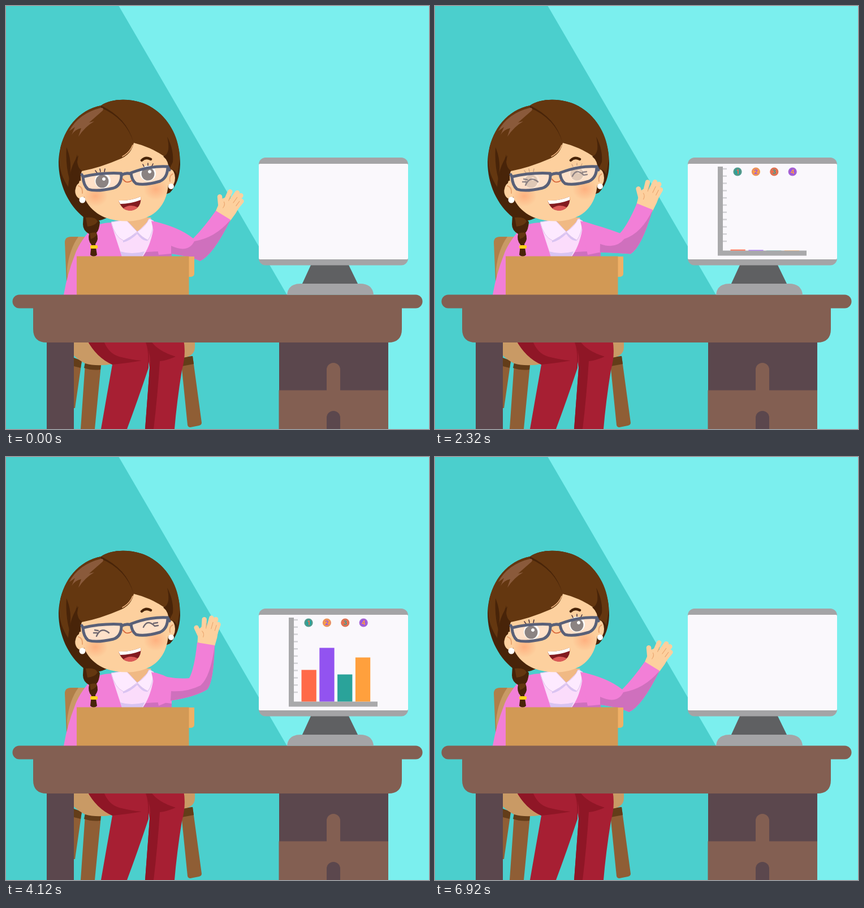
An HTML page that plays this animation: 748 by 748 pixels, repeating every 7000 ms.

```html
<!DOCTYPE html>
<html lang="en">
<head>
<meta charset="utf-8">
<title>Teacher at a desk</title>
<style>
html, body { margin: 0; width: 100%; height: 100%; overflow: hidden; background: #4bcfcd; }
svg { display: block; width: 100vw; height: 100vh; }
text { font: 700 11px Inter, Arial, sans-serif; text-anchor: middle; }
.line { fill: none; stroke-linecap: round; stroke-linejoin: round; }
</style>
</head>
<body>
<svg viewBox="0 0 748 748">
<defs>
  <radialGradient id="blush">
    <stop offset="0" stop-color="#ff9c6c" stop-opacity=".6"/>
    <stop offset="1" stop-color="#ff9c6c" stop-opacity="0"/>
  </radialGradient>
</defs>
<path fill="#4bcfcd" d="M0 0H748V748H0Z"/>
<path fill="#7befee" d="M199.500 0H748V748H635Z"/>

<!-- chair -->
<path fill="#b07f49" d="M104 418Q104 408 115 408H150V511H108Z"/>
<path fill="#c99a65" d="M128 408H150V511H110L108 465Q112 430 128 408Z"/>
<path fill="#8f5e35" d="M119 622L134 628 122 711H119ZM140 632L168 635 157 748H132ZM309 622L330 619 346 737Q346 741 341 742L326 745Q322 745 321 741Z"/>
<path fill="#633d19" d="M120 622L134 627 132 640 120 637ZM140 630L168 633 167 643Q152 645 138 640ZM309 622L330 619 332 633 311 637Z"/>
<path fill="#c99a65" d="M120 590H334V604Q333 620 312 622L190 633Q160 638 140 632Q128 626 120 618Z"/>

<!-- legs -->
<path fill="#a71f33" d="M143 590H252L252 640Q232 700 214 748H168Q178 690 188 634Q161 622 143 590Z"/>
<path fill="#a71f33" d="M245 590H314Q319 616 311 644Q302 700 298 748H246L254 640Z"/>
<path fill="#8f1626" d="M143 590H172Q180 614 200 620Q224 626 240 627Q212 632 188 634Q160 622 143 590ZM247 595Q257 610 250 645Q254 612 247 595Z"/>
<path fill="#8f1626" d="M246 592H256Q268 610 300 620Q284 627 272 628Q268 690 261 748H246L254 640Q258 618 246 592Z"/>

<!-- torso -->
<path fill="#f27fd7" d="M187 383Q163 383 150 395Q128 420 121 442Q108 475 102 511H140L150 445H293V395Q280 384 258 380Z"/>
<path fill="#cf70bd" d="M243 436Q270 432 293 436V444H240Z"/>
<path fill="#fbdcfb" d="M186 384L210 376H256L262 384Q258 420 242 443H205Q194 410 186 384Z"/>
<path fill="#d9c4f2" d="M207 415L233 400 251 415Q242 417 232 403Q220 415 207 418ZM202 434Q222 440 245 434L241 443H205Z"/>
<path fill="#f0b984" d="M207 374H257L250 382 232 400Q215 388 207 374Z"/>
<path fill="#fdeaff" stroke="#dcc0ec" d="M212 378L186 382Q192 408 208 415Q222 408 232 399ZM253 376L261 380Q260 402 251 414Q240 409 232 399Q247 390 253 376Z"/>

<!-- waving arm -->
<g id="hand">
  <path fill="#fdd09e" d="M-15 1Q-17 -14 -18 -22L-12 -30 17 -28Q18 -14 16 1Q16 11 0 11Q-14 11 -15 1Z"/>
  <path class="line" stroke="#fdd09e" stroke-width="8.5" d="M-11 -10Q-17 -18 -22 -25M-8 -20L-11 -42M-1 -22L1 -47M6 -20L9 -46M12 -18L15 -38"/>
  <path class="line" stroke="#e9a26b" stroke-width="1" d="M-5 -27L-6 -36M4 -28L5 -40M11 -26L12 -36M-11 -21Q-6 -18 -7 -11"/>
  <path class="line" stroke="#e9a26b" stroke-width="2" d="M-14 1Q0 8 15 2"/>
</g>
<path id="sleeve" fill="#f27fd7"/>
<path id="shade" fill="#cf70bd"/>

<!-- head -->
<path fill="#482409" d="M168 176C185 164 215 163 240 171C283 186 308 230 308 280Q307 312 290 330L170 378Q150 384 138 374C110 352 93 315 93 276C94 230 122 185 168 176Z"/>
<g fill="#fdd09e">
  <ellipse cx="132" cy="325" rx="10" ry="16"/>
  <ellipse cx="291" cy="304" rx="8" ry="15"/>
  <path d="M133 285C128 335 145 361 175 374C210 386 245 381 265 364C286 345 290 320 287 272L262 240H210Z"/>
</g>
<path class="line" stroke="#eaa671" stroke-width="2" d="M128 318Q136 320 135 331M295 297Q288 300 290 310"/>
<ellipse cx="158" cy="336" rx="22" ry="19" fill="url(#blush)"/>
<ellipse cx="265" cy="324" rx="22" ry="19" fill="url(#blush)"/>
<circle cx="135" cy="343" r="5.5" fill="#fff"/>
<circle cx="292" cy="319" r="5" fill="#fff"/>
<path fill="#643710" d="M168 176C185 164 215 163 240 171C283 186 308 230 307 272L303 298Q297 286 288 290Q288 276 283 268Q256 249 226 242Q222 262 203 270Q166 286 134 292L126 306Q123 285 128 264Q112 285 110 320Q95 298 94 272C95 228 122 185 168 176Z"/>
<path fill="#482409" d="M168 176Q214 198 225 240Q212 199 168 180ZM107 250Q118 275 112 306Q105 280 107 250ZM126 262Q124 285 134 291L129 313Q121 318 122 337Q108 315 126 262ZM285 231Q297 254 295 276L288 290Q288 274 278 266Q292 262 285 231Z"/>
<path fill="#8a5a3b" d="M112 221Q128 190 168 180Q174 180 171 185L147 206 156 204Q140 213 128 231L133 216Q122 218 116 228L122 214Z"/>
<path class="line" stroke="#f3b984" stroke-width="1.5" d="M224 246Q219 259 206 266"/>
<path class="line" stroke="#482409" stroke-width="4.5" d="M240 273Q247 266 256 271"/>

<g fill="#ffeee8" fill-opacity=".58">
  <path id="lensL" d="M136 302Q170 294 204 296Q205 317 190 322Q160 329 145 324Q137 317 136 302Z"/>
  <path id="lensR" d="M221 295Q255 282 286 284Q286 304 272 310Q245 318 230 314Q222 308 221 295Z"/>
</g>
<g id="open">
  <ellipse cx="171" cy="309" rx="14" ry="13.500" fill="#fff"/>
  <ellipse cx="251" cy="296" rx="14" ry="13.500" fill="#fff"/>
  <circle cx="170" cy="310" r="11.5" fill="#8b8382"/>
  <circle cx="251" cy="297" r="11.5" fill="#8b8382"/>
  <path fill="#fff" d="M173 303a3 3 0 1 0 .1 0ZM254 290a3 3 0 1 0 .1 0Z"/>
  <path class="line" stroke="#4d3740" stroke-width="1.6" d="M161 295L158 291M167 293L166 288M174 293L175 288M244 284L242 280M251 282L251 278M258 283L260 279"/>
</g>
<g id="shut">
  <path class="line" stroke="#706870" stroke-width="2.4" d="M160 317Q168 299 182 311M155 311L161 311M157 306L163 307M243 301Q250 286 263 299M261 294L268 293M263 299L269 298"/>
</g>
<g class="line" stroke="#596078" stroke-width="5">
  <use href="#lensL" fill="none"/><use href="#lensR" fill="none"/>
  <path d="M204 299Q212 294 221 297M286 284L289 290M136 302L134 298"/>
</g>
<path class="line" stroke="#d76539" stroke-width="1.7" d="M207 306Q212 315 222 309"/>
<path fill="#821b20" d="M199 344Q220 345 238 337Q240 351 231 358Q222 364 211 360Q203 356 199 344Z"/>
<path fill="#fff" d="M199 344Q220 345 238 337L238 343Q220 350 202 350Z"/>
<path fill="#dc5a57" d="M207 358Q219 349 233 356Q227 362 219 362Q212 361 207 358Z"/>

<!-- braid -->
<path fill="#482409" d="M137 368Q158 369 166 382Q165 396 160 401Q165 412 158 421L161 440Q155 446 149 440L151 422Q144 414 147 403Q136 397 136 386Z"/>
<path fill="#643710" d="M141 374Q159 372 162 381Q157 389 144 390ZM148 402Q163 398 160 405Q157 410 150 412Z"/>
<rect x="149" y="423" width="13" height="6" rx="2" fill="#ffd21c"/>

<!-- laptop and desk -->
<path fill="#efb066" d="M320 443H333V473Q333 479 325 479H320Z"/>
<path fill="#d29955" d="M125 442.500H323.500V511H125Z"/>
<path fill="#5b474d" d="M72 590H120V748H72ZM483 590H676V680H483Z"/>
<path fill="#835f52" d="M482.500 679.500H676V748H482.500ZM567 680V643a12 12 0 0 1 24 0V680Z"/>
<path fill="#5b474d" d="M567 748V728a12 12 0 0 1 24 0V748Z"/>
<rect x="11.500" y="510.500" width="725" height="24" rx="12" fill="#835f52"/>
<path fill="#835f52" d="M48 530H700V571Q700 595 676 595H72Q48 595 48 571Z"/>

<!-- monitor -->
<path fill="#5f6062" d="M540 456H605L623 493H523Z"/>
<path fill="#a4a4a6" d="M497 510.500Q499 491 521 491H626Q648 491 650 510.500Z"/>
<rect x="447" y="268" width="264" height="190.500" rx="12" fill="#a4a4a6"/>
<rect x="447" y="279" width="264" height="169" rx="2" fill="#faf8fc"/>
<g id="chart">
  <path id="ticks" stroke="#d2d2d6" stroke-width="2.500"/>
  <path fill="#a9a9ab" d="M500 284H509V432.500H657V441.500H500Z"/>
  <g id="badges"></g>
</g>
<g id="bars"></g>
</svg>
<script>
const LOOP = 7000, STEP = 40, BASE = 432.5;
const get = id => document.getElementById(id);
const clamp = v => Math.max(0, Math.min(1, v));
const ease = v => v * v * (3 - 2 * v);
const ramp = (t, from, to) => ease(clamp((t - from) / (to - from)));

function add(parent, tag, attrs, label = "") {
  const el = document.createElementNS("http://www.w3.org/2000/svg", tag);
  for (const key in attrs) el.setAttribute(key, attrs[key]);
  el.textContent = label;
  parent.append(el);
  return el;
}

// Interpolates rows of [time, values].
function sample(rows, t) {
  let i = 0;
  while (i < rows.length - 2 && t >= rows[i + 1][0]) i++;
  const [t0, a] = rows[i], [t1, b] = rows[i + 1];
  const k = ramp(t, t0, t1);
  return a.map((v, n) => v + (b[n] - v) * k);
}

// Top bend, inner elbow, inner bend, wrist pair, outer bend, outer elbow,
// lower bend, armpit, three shade points, shade end, hand angle.
const OUT = [305,390, 331,411, 350,392, 371,362, 397,378, 366,441, 343,451,
  327,443, 292,438, 370,410, 333,416, 322,438, 292,424, 31];
const UP = [285,393, 318,381, 322,372, 325,319, 357,320, 364,395, 352,410,
  335,424, 291,430, 356,383, 338,403, 315,414, 292,413, 0];
const MID = [290,394, 324,391, 333,375, 338,328, 369,333, 367,398, 356,411,
  335,424, 291,431, 362,388, 344,404, 320,416, 292,414, 11];
const ARM = [[0, OUT], [2100, OUT], [2700, UP], [3200, UP], [4120, MID], [4800, OUT], [LOOP, OUT]];

const HEIGHTS = [[0, [0,0,0,0]], [2240, [0,0,0,0]], [3000, [58,33,9,15]],
  [4120, [56,95,48,78]], [5000, [126,81,85,54]], [5440, [64,120,113,86]], [LOOP, [64,120,113,86]]];

const TEAL = "#2aa39a", ORANGE = "#ffa03d", RED = "#ff6a48", PURPLE = "#9253f0";
const bars = [RED, PURPLE, TEAL, ORANGE].map((fill, i) =>
  add(get("bars"), "rect", { x: 522.5 + i * 31.8, width: 26.3, fill }));

const badges = [[TEAL, RED], [ORANGE, PURPLE], [RED, TEAL], [PURPLE, ORANGE]].map(([back, ink], i) => {
  const g = add(get("badges"), "g", {});
  const x = 535 + i * 32.4;
  add(g, "circle", { cx: x, cy: 293, r: 7.6, fill: back });
  add(g, "circle", { cx: x, cy: 293, r: 6.2, fill: "none", stroke: ink, "stroke-width": 0.8, opacity: 0.6 });
  add(g, "text", { x, y: 297, fill: ink }, i + 1);
  return g;
});

get("ticks").setAttribute("d",
  Array.from({ length: 11 }, (_, i) => `M509 ${288 + i * 12.8}h7`).join(""));

function drawArm(t) {
  const p = sample(ARM, t);
  const at = n => p[2 * n].toFixed(2) + " " + p[2 * n + 1].toFixed(2);
  get("sleeve").setAttribute("d", `M257 380Q${at(0)} ${at(1)}Q${at(2)} ${at(3)}L${at(4)}` +
    `Q${at(5)} ${at(6)}Q${at(7)} ${at(8)}L270 440Z`);
  get("shade").setAttribute("d", `M${at(4)}Q${at(5)} ${at(6)}Q${at(7)} ${at(8)}` +
    `L${at(12)}Q${at(11)} ${at(10)}Q${at(9)} ${at(4)}Z`);
  const x = (p[6] + p[8]) / 2, y = (p[7] + p[9]) / 2;
  get("hand").setAttribute("transform", `translate(${x} ${y}) rotate(${p[26]})`);
}

function draw(t) {
  drawArm(t);
  const smile = ramp(t, 2160, 2400) * (1 - ramp(t, 5120, 5500));
  get("shut").setAttribute("opacity", smile);
  get("open").setAttribute("opacity", 1 - smile);

  get("chart").setAttribute("opacity", ramp(t, 400, 900) * (1 - ramp(t, 6560, 6880)));
  badges.forEach((g, i) => g.setAttribute("opacity", ramp(t, 800 + i * 120, 1120 + i * 120)));

  get("bars").setAttribute("opacity", 1 - ramp(t, 5120, 5500));
  sample(HEIGHTS, t).forEach((h, i) => {
    bars[i].setAttribute("y", BASE - h);
    bars[i].setAttribute("height", h);
  });
}

const start = performance.now();
function tick() {
  const t = (performance.now() - start) % LOOP;
  draw(Math.floor(t / STEP) * STEP);
  requestAnimationFrame(tick);
}
tick();
</script>
</body>
</html>
```
